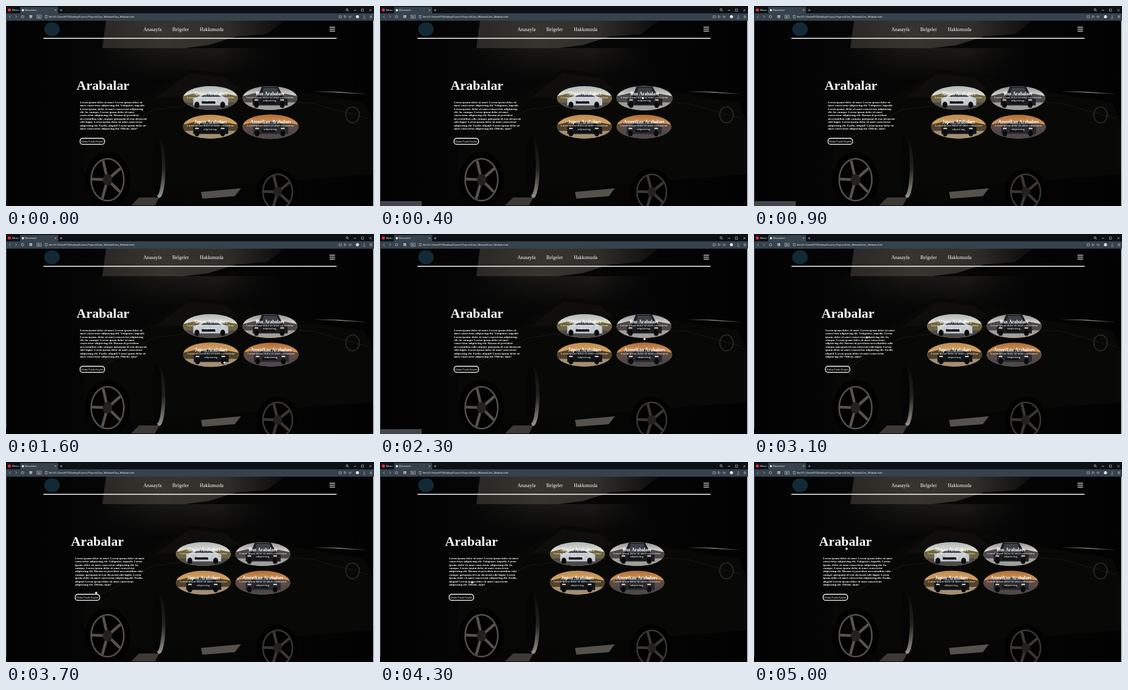
Animation of 600x327 px, one loop 5100 ms. Source, as an HTML page with a canvas:

```html
<!DOCTYPE html>
<html lang="tr">
<head>
<meta charset="utf-8">
<title>Arabalar</title>
<style>
html, body { margin: 0; width: 100%; height: 100%; overflow: hidden; background: #000; }
canvas { display: block; width: 600px; height: 327px; }
</style>
</head>
<body>
<canvas id="stage"></canvas>
<script>
const LOOP = 5100, STEP = 100, W = 600, H = 327;
const SERIF = '"Liberation Serif", serif', SANS = '"Liberation Sans", sans-serif';
const INK = '#cbd2d7', SLATE = '#36424c';
const canvas = document.getElementById('stage');
const ratio = window.devicePixelRatio || 1;
canvas.width = W * ratio;
canvas.height = H * ratio;
const page = canvas.getContext('2d');
let c = page;

const clamp = v => Math.max(0, Math.min(1, v));
const easeOut = p => 1 - (1 - p) ** 2;

// Drawing helpers

function text(s, x, y, size, { weight = 'normal', family = SERIF, align = 'left' } = {}) {
  c.font = `${weight} ${size}px ${family}`;
  c.fillStyle = '#fff';
  c.textAlign = align;
  c.fillText(s, x, y);
}
function rect(x, y, w, h, fill) {
  c.fillStyle = fill;
  c.fillRect(x, y, w, h);
}
function trace(p) {
  c.beginPath();
  for (let i = 0; i < p.length; i += 2) c.lineTo(p[i], p[i + 1]);
}
function poly(fill, ...p) {
  trace(p);
  c.fillStyle = fill;
  c.fill();
}
function line(color, width, ...p) {
  trace(p);
  c.strokeStyle = color;
  c.lineWidth = width;
  c.stroke();
}
function oval(x, y, rx, ry, fill) {
  c.beginPath();
  c.ellipse(x, y, rx, ry, 0, 0, Math.PI * 2);
  c.fillStyle = fill;
  c.fill();
}
function ring(x, y, rx, ry, color, width) {
  c.beginPath();
  c.ellipse(x, y, rx, ry, 0, 0, Math.PI * 2);
  c.strokeStyle = color;
  c.lineWidth = width;
  c.stroke();
}
function frame(x, y, w, h) {
  c.strokeStyle = INK;
  c.lineWidth = .6;
  c.strokeRect(x, y, w, h);
}
function cross(x, y, r) {
  line(INK, .6, x - r, y - r, x + r, y + r);
  line(INK, .6, x - r, y + r, x + r, y - r);
}
function blend(x0, y0, x1, y1, ...colors) {
  const g = c.createLinearGradient(x0, y0, x1, y1);
  colors.forEach((col, i) => g.addColorStop(i / (colors.length - 1), col));
  return g;
}

// Still parts

function wheel(x, y, rx, ry, color) {
  oval(x, y, rx * 1.2, ry * 1.2, '#020202');
  ring(x, y, rx * .86, ry * .9, color, 2.5);
  for (let i = 0; i < 5; i++) {
    const a = i * Math.PI * .4 - .6;
    line(color, 4.5, x, y, x + Math.cos(a) * rx * .82, y + Math.sin(a) * ry * .86);
  }
  oval(x, y, rx * .25, ry * .25, '#24221f');
}

function backdrop() {
  rect(0, 24, W, H, blend(0, 0, W, 0, '#020202', '#050505', '#070706', '#040404', '#020202'));
  // sky with the hill below it
  rect(140, 69, 310, 60, blend(140, 0, 450, 0, 'rgba(24,23,21,0)', '#171614', '#1c1a18', 'rgba(18,17,16,0)'));
  rect(140, 69, 310, 60, blend(0, 69, 0, 125, 'rgba(5,5,5,0)', '#050505'));
  poly(blend(158, 0, 455, 0, '#2b2825', '#38342f', '#312e2a', '#0c0b0b'),
    163, 24, 455, 24, 425, 46, 375, 50, 330, 64, 290, 69, 157, 69);
  // car body
  poly('#080807', 130, 215, 215, 158, 300, 104, 375, 113, 430, 133, 584, 158, 600, 193, 600, 275, 205, 306, 126, 270);
  poly('#0f0e0d', 244, 151, 298, 110, 358, 117, 380, 134, 340, 147);
  line('#1b1a18', 1, 150, 220, 240, 170, 380, 151, 500, 159, 590, 184);
  line(blend(500, 0, 590, 0, 'rgba(140,136,130,0)', '#8a8680', 'rgba(140,136,130,0)'), 1.6, 500, 140, 535, 140.5, 590, 144);
  ring(565, 178, 11, 13, '#2e2d2b', 1.6);
  // light on the ground
  poly('#55514c', 318, 304, 383, 298, 373, 311, 320, 315);
  poly('#3d3a36', 217, 313, 250, 313, 243, 326, 204, 326);
  oval(250, 266, 10, 48, blend(0, 218, 0, 314, '#0d0c0b', '#24221f', '#99948c'));
  oval(246, 262, 8, 48, '#050505');
  wheel(165.5, 284, 31, 38, '#57534d');
  wheel(443, 304, 28, 32, '#3a3734');
  rect(598.8, 24, 1.2, 303, '#f4f4f4');
}

function chrome() {
  const ui = { family: SANS };
  rect(0, 0, W, 13, '#0d1115');
  rect(23, 1.5, 62, 12, SLATE);
  rect(0, 12, W, 12, SLATE);
  rect(0, 24, 1.2, 295, SLATE);
  oval(5.5, 6.5, 2.5, 2.5, '#f22a3a');
  text('Menu', 10, 8.4, 4.3, ui);
  oval(27.5, 6.8, 1.9, 1.9, '#dfe4e7');
  text('Document', 31, 8.4, 4.1, ui);
  cross(80.7, 6.8, 1.3);
  line(INK, .6, 88, 6.8, 92, 6.8);
  line(INK, .6, 90, 4.8, 90, 8.8);
  ring(556, 6, 1.6, 1.6, INK, .7);
  line(INK, .7, 557.2, 7.2, 558.8, 8.8);
  line(INK, .7, 567, 7, 571, 7);
  frame(579.5, 5, 3.4, 3.4);
  cross(594.2, 6.8, 1.8);
  // toolbar
  for (const [x, d] of [[6.5, 1], [16.5, -1]]) line(INK, .7, x + d, 15.5, x - d, 17.5, x + d, 19.5);
  ring(27, 17.5, 2, 2, INK, .7);
  for (let i = 0; i < 4; i++) frame(38.5 + i % 2 * 2.2, 15.5 + (i >> 1) * 2.2, 1.5, 1.5);
  frame(50.5, 15, 7, 5);
  text('file', 54, 18.8, 3.2, { family: SANS, align: 'center' });
  frame(64, 15.4, 3, 4.2);
  text('file:///C:/Users/PC/Desktop/Course-Projects/Cars_Website/Cars_Website.html', 70, 19, 4.02, ui);
  frame(543, 16, 4, 3.2);
  line(INK, .6, 551.5, 15.5, 555, 17.5, 551.5, 19.5, 551.5, 15.5);
  line(INK, .6, 561, 19.8, 558.8, 17, 561, 16.4, 563.2, 17, 561, 19.8);
  oval(573, 17.6, 2.5, 2.5, '#e5e9eb');
  line(INK, .7, 584, 15, 584, 18.5);
  line(INK, .6, 582, 20, 586, 20);
  for (let i = 0; i < 3; i++) line(INK, .6, 593, 16 + i * 1.6, 597, 16 + i * 1.6);
}

function header() {
  oval(75, 38, 12.7, 11.3, '#122a36');
  text('Anasayfa', 224, 40.6, 7.9);
  text('Belgeler', 271.3, 40.6, 7.9);
  text('Hakkımızda', 316, 40.6, 7.9);
  rect(61, 52, 478, 1.5, '#f4f4f4');
  for (let i = 0; i < 3; i++) rect(527.5, 34.1 + i * 3.2, 9, 1.1, '#fff');
}

// Motion

// Each move eases the pointer to a place between two times.
const MOVES = [
  { from: 0, to: 100, x: 437, y: 188 },
  { from: 100, to: 500, x: 428, y: 148 },
  { from: 600, to: 1000, x: 330, y: 190 },
  { from: 1100, to: 1700, x: 357, y: 211 },
  { from: 1700, to: 2100, x: 434, y: 188 },
  { from: 2200, to: 2800, x: 425, y: 135 },
  { from: 2800, to: 2900, x: 206, y: 145 },
  { from: 3000, to: 3500, x: 145, y: 212 },
  { from: 3600, to: 4100, x: 150.5, y: 217.5 },
  { from: 4200, to: 4500, x: 150, y: 180 },
  { from: 4600, to: 5000, x: 151, y: 142 }
];
function pointer(t) {
  let { x, y } = MOVES[0];
  for (const m of MOVES) {
    const p = easeOut(clamp((t - m.from) / (m.to - m.from)));
    x += (m.x - x) * p;
    y += (m.y - y) * p;
  }
  return { x, y };
}

// 1 while the cards are in use, then the layout settles to the left.
const shift = t => (1 - clamp((t - 2800) / 700)) ** 1.4;

const CARDS = [
  { label: 'Alman Arabaları', col: 0, row: 0, sky: ['#aab6bd', '#e6e2cb', '#c39a4c'], ground: '#4a4a4c', body: '#c3c9cf', far: '#6f6440' },
  { label: 'Rus Arabaları', col: 1, row: 0, sky: ['#8f8d8b', '#d8d7d4', '#b5b3b0'], ground: '#a09e9b', body: '#1d1c1f', far: '#4b4847', tall: true },
  { label: 'Japon Arabaları', col: 0, row: 1, sky: ['#b98a50', '#dca664', '#8a7860'], ground: '#a38f74', body: '#141518', far: '#51422c' },
  { label: 'Amerikan Arabaları', col: 1, row: 1, sky: ['#a86a3a', '#dc9a55', '#86685a'], ground: '#4d494a', body: '#29292d', far: '#5c4a43' }
];
const place = (card, t) => ({ x: 321.8 + 97 * card.col + 11.5 * shift(t), y: 150.6 + 46.6 * card.row });

// Hover follows the pointer with a lag: the share of recent steps spent inside.
function hover(card, t) {
  let inside = 0;
  for (let i = 0; i < 3; i++) {
    const p = pointer(t - i * STEP), o = place(card, t - i * STEP);
    if (Math.hypot((p.x - o.x) / 45, (p.y - o.y) / 20) < 1) inside++;
  }
  return inside / 3;
}
// The card headings are links.
function onLink(t) {
  const p = pointer(t);
  return t >= 0 && CARDS.some(card => {
    const o = place(card, t);
    return Math.abs(p.x - o.x) < 30 && Math.abs(p.y - o.y + 7.5) < 7.5;
  });
}

// Moving parts

// A card scene fills a box from -45,-20 to 45,20.
function scene({ sky, ground, body, far, tall }) {
  rect(-46, -21, 92, 42, blend(0, -20, 0, 12, ...sky));
  poly(far, -46, -3, -25, -8, 0, -2, 25, -7, 46, -3, 46, 8, -46, 8);
  rect(-46, 7, 92, 14, ground);
  const roof = tall ? -19 : -8;
  poly(body, -28, 0, -20, -2, -13, roof, 13, roof, 22, -2, 29, 1, 29, 12, -28, 12);
  poly('#3a4046', -15, -2, -10, roof + 2, 11, roof + 2, 17, -2);
  rect(-14, 5, 22, 4, '#0f1012');
  for (const x of [-22, 20]) {
    oval(x, 11, 4, 5, '#0b0b0c');
    rect(x - 3, 2, 6, 2, '#d9d9d5');
  }
}

function drawCard(card, t, push) {
  const { x: base, y } = place(card, t), grow = hover(card, t);
  const w = 89.5 + 2 * grow, h = 39 + grow, x = base + grow + push;
  c.save();
  c.beginPath();
  c.ellipse(x, y, w / 2, h / 2, 0, 0, Math.PI * 2);
  c.clip();
  c.translate(x, y);
  scene(card);
  c.restore();
  text(card.label, x, y - 5, 7.5, { weight: 'bold', align: 'center' });
  text('Lorem ipsum dolor sit amet consectetur', x, y + .2, 4.85, { align: 'center' });
  text('adipisicing.', x, y + 5.8, 4.85, { align: 'center' });
}

const LOREM = 'Lorem ipsum dolor sit amet consectetur adipisicing elit.';
const WORDS = `Lorem ipsum dolor sit amet. ${LOREM} Voluptates, impedit. ${LOREM.replace('ipsum', 'ipsum,')} In, cumque. ` +
  `${LOREM} Harum sit provident necessitatibus odio cumque quisquam id rem obcaecati odit fugiat. ` +
  `${LOREM} Facilis, aliquid! ${LOREM} Officiis, nam?`;

function wrap(words, limit) {
  const lines = [''];
  for (const word of words.split(' ')) {
    const last = lines.length - 1;
    const next = lines[last] ? lines[last] + ' ' + word : word;
    if (c.measureText(next).width > limit) lines.push(word);
    else lines[last] = next;
  }
  return lines;
}

function content(t) {
  const s = shift(t), x = 112.5 + 8 * s, bold = { weight: 'bold' };
  text('Arabalar', 106 + 9 * s, 137, 21.8, bold);
  c.font = `bold 4.67px ${SERIF}`;
  wrap(LOREM && WORDS, 118 - 7 * s).forEach((l, i) => text(l, x, 158.9 + i * 5.38, 4.67, bold));

  c.beginPath();
  c.roundRect(x + .3, 216.4, 39.8, 9.8, 4);
  c.fillStyle = '#080808';
  c.fill();
  c.strokeStyle = '#d5d5d5';
  c.lineWidth = 1.6;
  c.stroke();
  text('Daha Fazla Keşfet', x + 20.2, 222.9, 4.25, { family: SANS, align: 'center' });

  // A grown card pushes its right-hand neighbour.
  CARDS.forEach((card, i) => drawCard(card, t, card.col ? 2 * hover(CARDS[i - 1], t) : 0));
}

const still = document.createElement('canvas');
still.width = canvas.width;
still.height = canvas.height;
c = still.getContext('2d');
c.scale(ratio, ratio);
backdrop();
chrome();
header();
c = page;
c.scale(ratio, ratio);

const start = performance.now();
function draw() {
  const now = (performance.now() - start) % LOOP;
  const t = Math.floor(now / STEP) * STEP;
  c.drawImage(still, 0, 0, W, H);
  content(t);
  if (onLink(t - 300)) rect(0, 319, 68, 8, '#43464a');
  const p = pointer(t);
  oval(p.x, p.y, 2.1, 2.1, '#222');
  oval(p.x, p.y, 1.7, 1.7, '#fff');
  requestAnimationFrame(draw);
}
draw();
</script>
</body>
</html>
```
